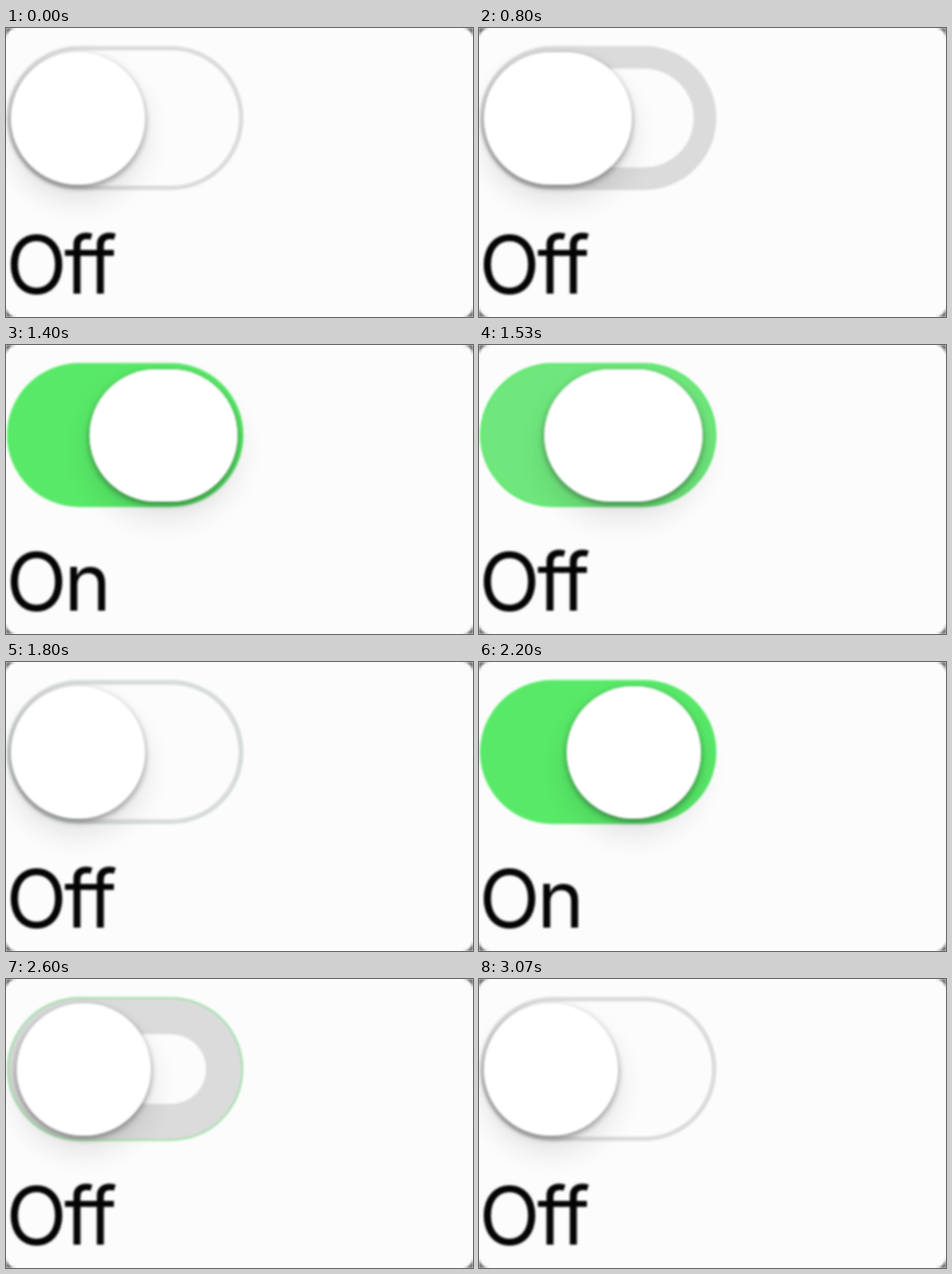
Animation, 480 px wide and 297 px high, one loop 3990 ms. Source, as an HTML page with a canvas:

```html
<!DOCTYPE html>
<html lang="en">
<head>
<meta charset="utf-8">
<title>Toggle switch</title>
<style>
  html, body { margin: 0; width: 100%; height: 100%; overflow: hidden; background: #fdfcfd; }
  canvas { display: block; filter: blur(1.1px); }
</style>
</head>
<body>
<canvas id="stage" width="480" height="297"></canvas>
<script>
const ctx = document.getElementById('stage').getContext('2d');
const LOOP = 3990, FPS = 15;
const PAPER = '#fdfcfd', GREY = [219, 219, 220], GREEN = [88, 233, 104];

// Press and release times; every release flips the switch.
const taps = [[733, 930], [1333, 1480], [2000, 2000], [2388, 2388]];

function ease(t, start, length) {
  const u = Math.min(1, Math.max(0, (t - start) / length));
  return u * u * (3 - 2 * u);
}

function switchAt(t) {
  const state = { on: false, slide: 0, stretch: 0, fill: 0, green: 0, rim: 0 };
  taps.forEach(([press, release], i) => {
    const on = i % 2 === 0;
    const move = (part, start, length) => {
      state[part] += (on - state[part]) * ease(t, start, length);
    };
    if (t > release) state.on = on;
    move('slide', release, 250);
    move('fill', on ? press : release + 82, on ? 200 : 250);
    move('green', release, on ? 133 : 200);
    move('rim', release, on ? 133 : 380);
    // The knob widens only while it is held.
    state.stretch += ease(Math.min(t, release), press, 133) * (1 - ease(t, release, 250));
  });
  return state;
}

const mix = k => `rgb(${GREY.map((c, i) => Math.round(c + (GREEN[i] - c) * k))})`;

function pill(x, y, w, h, color, radius = Math.min(w, h) / 2) {
  ctx.beginPath();
  ctx.roundRect(x, y, w, h, radius);
  ctx.fillStyle = color;
  ctx.fill();
}

function shadow(alpha, blur, offset) {
  ctx.shadowColor = `rgba(0,0,0,${alpha})`;
  ctx.shadowBlur = blur;
  ctx.shadowOffsetY = offset;
}

function draw(t) {
  const { on, slide, stretch, fill, green, rim } = switchAt(t);
  ctx.fillStyle = '#666';
  ctx.fillRect(0, 0, 480, 297);
  pill(0, 0, 480, 297, PAPER, 11);

  // Track: rim, body, then the pale inner pill that closes when filled.
  pill(1, 18.5, 243, 148, mix(rim));
  pill(3, 20.5, 239, 144, mix(green));
  const inset = 4.5 + 72 * fill;
  if (inset < 74) pill(1 + inset, 18.5 + inset, 243 - 2 * inset, 148 - 2 * inset, PAPER);

  const extra = 28 * stretch;
  const x = 5 + (95 - extra) * slide;
  shadow(0.11, 30, 16);
  pill(x, 25, 138 + extra, 136, '#fff');
  shadow(0.42, 6, 2.5);
  pill(x, 25, 138 + extra, 136, '#fff');
  shadow(0, 0, 0);

  ctx.font = '82px Inter, sans-serif';
  ctx.letterSpacing = '-3px';
  ctx.fillStyle = '#050505';
  ctx.fillText(on ? 'On' : 'Off', 0, 273);
}

function frame() {
  const t = performance.now() % LOOP;
  draw(Math.floor((t + 4) * FPS / 1000) * 1000 / FPS);
  requestAnimationFrame(frame);
}
frame();
</script>
</body>
</html>
```
